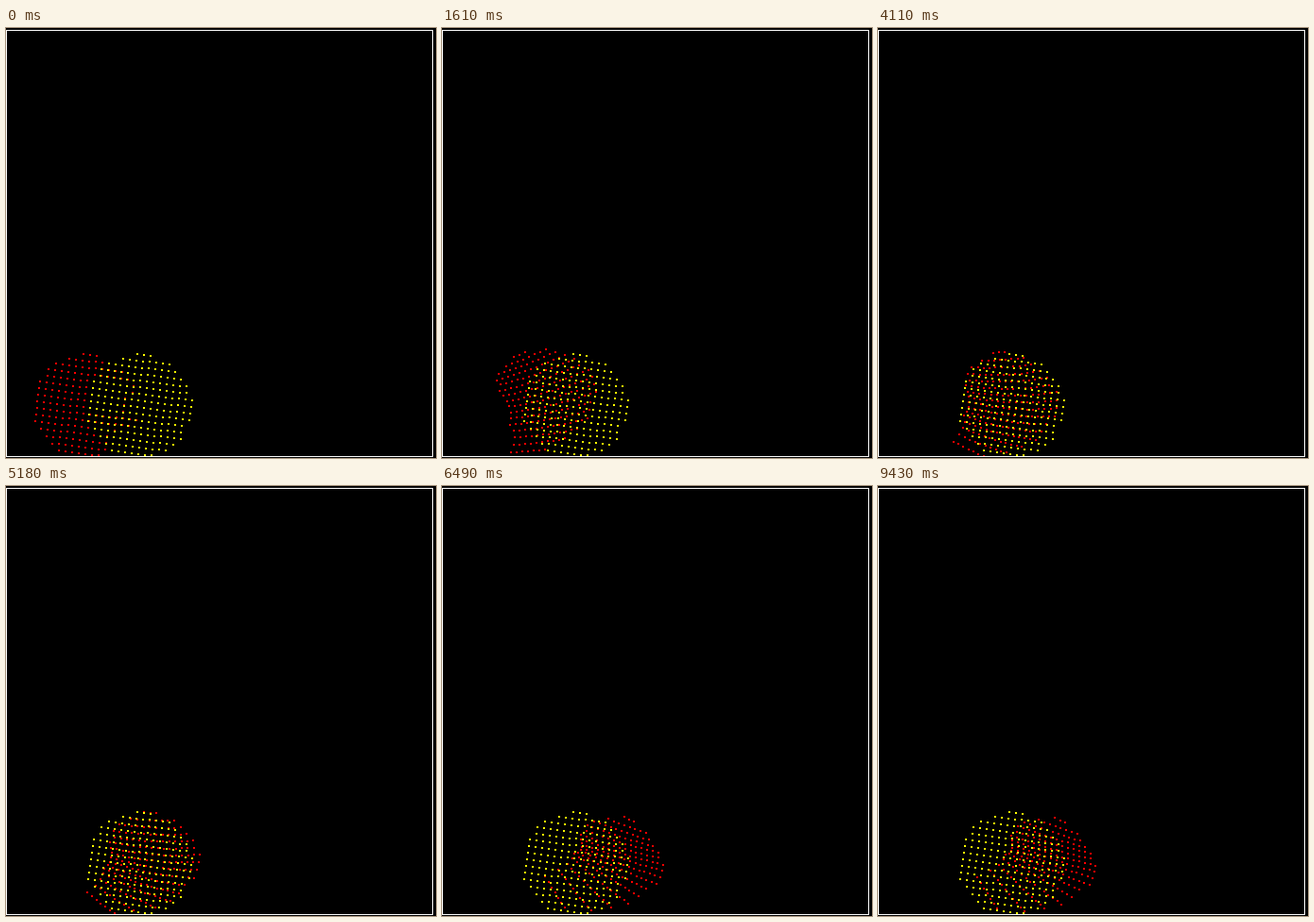
Animation, 455 px wide and 455 px high, one loop 9.53 s. Source, as an HTML page without scripts:

```html
<!DOCTYPE html>
<html lang="en">
<head>
<meta charset="utf-8">
<title>Dot lattice warp</title>
<style>
/* Warp coefficients: each name spells the powers of a (along row) and b (across rows). */
@property --x0 { syntax: "<number>"; inherits: true; initial-value: 86.4 }
@property --xa { syntax: "<number>"; inherits: true; initial-value: 56 }
@property --xb { syntax: "<number>"; inherits: true; initial-value: -6.8 }
@property --xab { syntax: "<number>"; inherits: true; initial-value: 0 }
@property --xabb { syntax: "<number>"; inherits: true; initial-value: 0 }
@property --xbb { syntax: "<number>"; inherits: true; initial-value: 0 }
@property --xbbb { syntax: "<number>"; inherits: true; initial-value: 0 }
@property --y0 { syntax: "<number>"; inherits: true; initial-value: 398.2 }
@property --ya { syntax: "<number>"; inherits: true; initial-value: 6.8 }
@property --yb { syntax: "<number>"; inherits: true; initial-value: 55.6 }
@property --yaa { syntax: "<number>"; inherits: true; initial-value: 0 }
@property --yab { syntax: "<number>"; inherits: true; initial-value: 0 }
@property --yabb { syntax: "<number>"; inherits: true; initial-value: 0 }
@property --ybb { syntax: "<number>"; inherits: true; initial-value: 0 }

html, body { margin: 0; width: 100%; height: 100%; overflow: hidden; background: #000 }
main {
  position: absolute; left: 0; top: 2px; width: 450px; height: 450px;
  border: 1px solid #fff; overflow: hidden;
}
.set { position: absolute; left: -1px; top: -3px }
.fixed { color: #ff0; --x0: 142.9 }
.warp { color: #f00; animation: warp 9.53s infinite }
p { margin: 0; --b: calc((var(--r) - 2.5) / 8) }
i {
  --n: 0;
  --a: calc((var(--s) + var(--n) - 7.5) / 8);
  position: absolute; width: 2px; height: 2px; background: currentColor;
  left: calc((var(--x0) - 1
    + var(--a) * (var(--xa) + var(--b) * (var(--xab) + var(--b) * var(--xabb)))
    + var(--b) * (var(--xb) + var(--b) * (var(--xbb) + var(--b) * var(--xbbb)))) * 1px);
  top: calc((var(--y0) - 1
    + var(--a) * (var(--ya) + var(--a) * var(--yaa) + var(--b) * (var(--yab) + var(--b) * var(--yabb)))
    + var(--b) * (var(--yb) + var(--b) * var(--ybb))) * 1px);
}
i:nth-child(2) { --n: 1 }
i:nth-child(3) { --n: 2 }
i:nth-child(4) { --n: 3 }
i:nth-child(5) { --n: 4 }
i:nth-child(6) { --n: 5 }
i:nth-child(7) { --n: 6 }
i:nth-child(8) { --n: 7 }
i:nth-child(9) { --n: 8 }
i:nth-child(10) { --n: 9 }
i:nth-child(11) { --n: 10 }
i:nth-child(12) { --n: 11 }
i:nth-child(13) { --n: 12 }
i:nth-child(14) { --n: 13 }
i:nth-child(15) { --n: 14 }
i:nth-child(16) { --n: 15 }

@keyframes warp {
  0%, 5.14% {
    --x0: 86.4; --xa: 56; --xb: -6.8; --xab: 0; --xabb: 0; --xbb: 0; --xbbb: 0;
    --y0: 398.2; --ya: 6.8; --yb: 55.6; --yaa: 0; --yab: 0; --yabb: 0; --ybb: 0;
    animation-timing-function: steps(12);
  }
  12.59% {
    --x0: 108; --xa: 48; --xb: 26; --xab: 0; --xabb: 0; --xbb: -24; --xbbb: -14;
    --y0: 384; --ya: -17; --yb: 56; --yaa: -3; --yab: 6; --yabb: 0; --ybb: 8;
    animation-timing-function: steps(7);
  }
  16.89% {
    --x0: 115; --xa: 48; --xb: 22; --xab: 0; --xabb: 0; --xbb: -29; --xbbb: -20;
    --y0: 388; --ya: -13; --yb: 55; --yaa: -3; --yab: 9; --yabb: 0; --ybb: 9;
    animation-timing-function: steps(23);
  }
  31.26% {
    --x0: 127; --xa: 50; --xb: 9; --xab: 0; --xabb: -4; --xbb: -32; --xbbb: -17;
    --y0: 399; --ya: -1; --yb: 59; --yaa: -5; --yab: 11; --yabb: 0; --ybb: -4;
    animation-timing-function: steps(37);
  }
  54.35% {
    --x0: 157.5; --xa: 49; --xb: -8; --xab: -7; --xabb: -4; --xbb: -32; --xbbb: -23;
    --y0: 400; --ya: 6; --yb: 52; --yaa: -4; --yab: 14; --yabb: 12; --ybb: -6;
    animation-timing-function: steps(22);
  }
  68.1% {
    --x0: 190; --xa: 45; --xb: -9; --xab: -9; --xabb: -11; --xbb: -33; --xbbb: -38;
    --y0: 397; --ya: 16; --yb: 42; --yaa: -2; --yab: 13; --yabb: 18; --ybb: -4;
    animation-timing-function: steps(24);
  }
  82.79% {
    --x0: 200; --xa: 42; --xb: -11; --xab: -9; --xabb: -11; --xbb: -33; --xbbb: -40;
    --y0: 395.5; --ya: 21; --yb: 38; --yaa: -2; --yab: 12; --yabb: 16; --ybb: -6;
    animation-timing-function: steps(26);
  }
  98.95%, 100% {
    --x0: 185.5; --xa: 46; --xb: -8; --xab: -9; --xabb: -11; --xbb: -33; --xbbb: -38;
    --y0: 398; --ya: 16; --yb: 42; --yaa: -2; --yab: 13; --yabb: 18; --ybb: -4;
  }
}
</style>
</head>
<body>
<main>
<div class="set warp">
<p style="--r:-5;--s:6"><i></i><i></i><i></i></p>
<p style="--r:-4;--s:4"><i></i><i></i><i></i><i></i><i></i><i></i><i></i><i></i></p>
<p style="--r:-3;--s:2"><i></i><i></i><i></i><i></i><i></i><i></i><i></i><i></i><i></i><i></i><i></i></p>
<p style="--r:-2;--s:1"><i></i><i></i><i></i><i></i><i></i><i></i><i></i><i></i><i></i><i></i><i></i><i></i><i></i></p>
<p style="--r:-1;--s:1"><i></i><i></i><i></i><i></i><i></i><i></i><i></i><i></i><i></i><i></i><i></i><i></i><i></i><i></i></p>
<p style="--r:0;--s:0"><i></i><i></i><i></i><i></i><i></i><i></i><i></i><i></i><i></i><i></i><i></i><i></i><i></i><i></i><i></i></p>
<p style="--r:1;--s:0"><i></i><i></i><i></i><i></i><i></i><i></i><i></i><i></i><i></i><i></i><i></i><i></i><i></i><i></i><i></i><i></i></p>
<p style="--r:2;--s:0"><i></i><i></i><i></i><i></i><i></i><i></i><i></i><i></i><i></i><i></i><i></i><i></i><i></i><i></i><i></i><i></i></p>
<p style="--r:3;--s:0"><i></i><i></i><i></i><i></i><i></i><i></i><i></i><i></i><i></i><i></i><i></i><i></i><i></i><i></i><i></i><i></i></p>
<p style="--r:4;--s:0"><i></i><i></i><i></i><i></i><i></i><i></i><i></i><i></i><i></i><i></i><i></i><i></i><i></i><i></i><i></i><i></i></p>
<p style="--r:5;--s:0"><i></i><i></i><i></i><i></i><i></i><i></i><i></i><i></i><i></i><i></i><i></i><i></i><i></i><i></i><i></i></p>
<p style="--r:6;--s:0"><i></i><i></i><i></i><i></i><i></i><i></i><i></i><i></i><i></i><i></i><i></i><i></i><i></i><i></i><i></i></p>
<p style="--r:7;--s:1"><i></i><i></i><i></i><i></i><i></i><i></i><i></i><i></i><i></i><i></i><i></i><i></i><i></i><i></i></p>
<p style="--r:8;--s:2"><i></i><i></i><i></i><i></i><i></i><i></i><i></i><i></i><i></i><i></i><i></i><i></i></p>
<p style="--r:9;--s:3"><i></i><i></i><i></i><i></i><i></i><i></i><i></i><i></i><i></i><i></i></p>
<p style="--r:10;--s:4"><i></i><i></i><i></i><i></i><i></i><i></i><i></i></p>
</div>
<div class="set fixed">
<p style="--r:-5;--s:6"><i></i><i></i><i></i></p>
<p style="--r:-4;--s:4"><i></i><i></i><i></i><i></i><i></i><i></i><i></i><i></i></p>
<p style="--r:-3;--s:2"><i></i><i></i><i></i><i></i><i></i><i></i><i></i><i></i><i></i><i></i><i></i></p>
<p style="--r:-2;--s:1"><i></i><i></i><i></i><i></i><i></i><i></i><i></i><i></i><i></i><i></i><i></i><i></i><i></i></p>
<p style="--r:-1;--s:1"><i></i><i></i><i></i><i></i><i></i><i></i><i></i><i></i><i></i><i></i><i></i><i></i><i></i><i></i></p>
<p style="--r:0;--s:0"><i></i><i></i><i></i><i></i><i></i><i></i><i></i><i></i><i></i><i></i><i></i><i></i><i></i><i></i><i></i></p>
<p style="--r:1;--s:0"><i></i><i></i><i></i><i></i><i></i><i></i><i></i><i></i><i></i><i></i><i></i><i></i><i></i><i></i><i></i><i></i></p>
<p style="--r:2;--s:0"><i></i><i></i><i></i><i></i><i></i><i></i><i></i><i></i><i></i><i></i><i></i><i></i><i></i><i></i><i></i><i></i></p>
<p style="--r:3;--s:0"><i></i><i></i><i></i><i></i><i></i><i></i><i></i><i></i><i></i><i></i><i></i><i></i><i></i><i></i><i></i><i></i></p>
<p style="--r:4;--s:0"><i></i><i></i><i></i><i></i><i></i><i></i><i></i><i></i><i></i><i></i><i></i><i></i><i></i><i></i><i></i><i></i></p>
<p style="--r:5;--s:0"><i></i><i></i><i></i><i></i><i></i><i></i><i></i><i></i><i></i><i></i><i></i><i></i><i></i><i></i><i></i></p>
<p style="--r:6;--s:0"><i></i><i></i><i></i><i></i><i></i><i></i><i></i><i></i><i></i><i></i><i></i><i></i><i></i><i></i><i></i></p>
<p style="--r:7;--s:1"><i></i><i></i><i></i><i></i><i></i><i></i><i></i><i></i><i></i><i></i><i></i><i></i><i></i><i></i></p>
<p style="--r:8;--s:2"><i></i><i></i><i></i><i></i><i></i><i></i><i></i><i></i><i></i><i></i><i></i><i></i></p>
<p style="--r:9;--s:3"><i></i><i></i><i></i><i></i><i></i><i></i><i></i><i></i><i></i><i></i></p>
<p style="--r:10;--s:4"><i></i><i></i><i></i><i></i><i></i><i></i><i></i></p>
</div>
</main>
</body>
</html>
```
